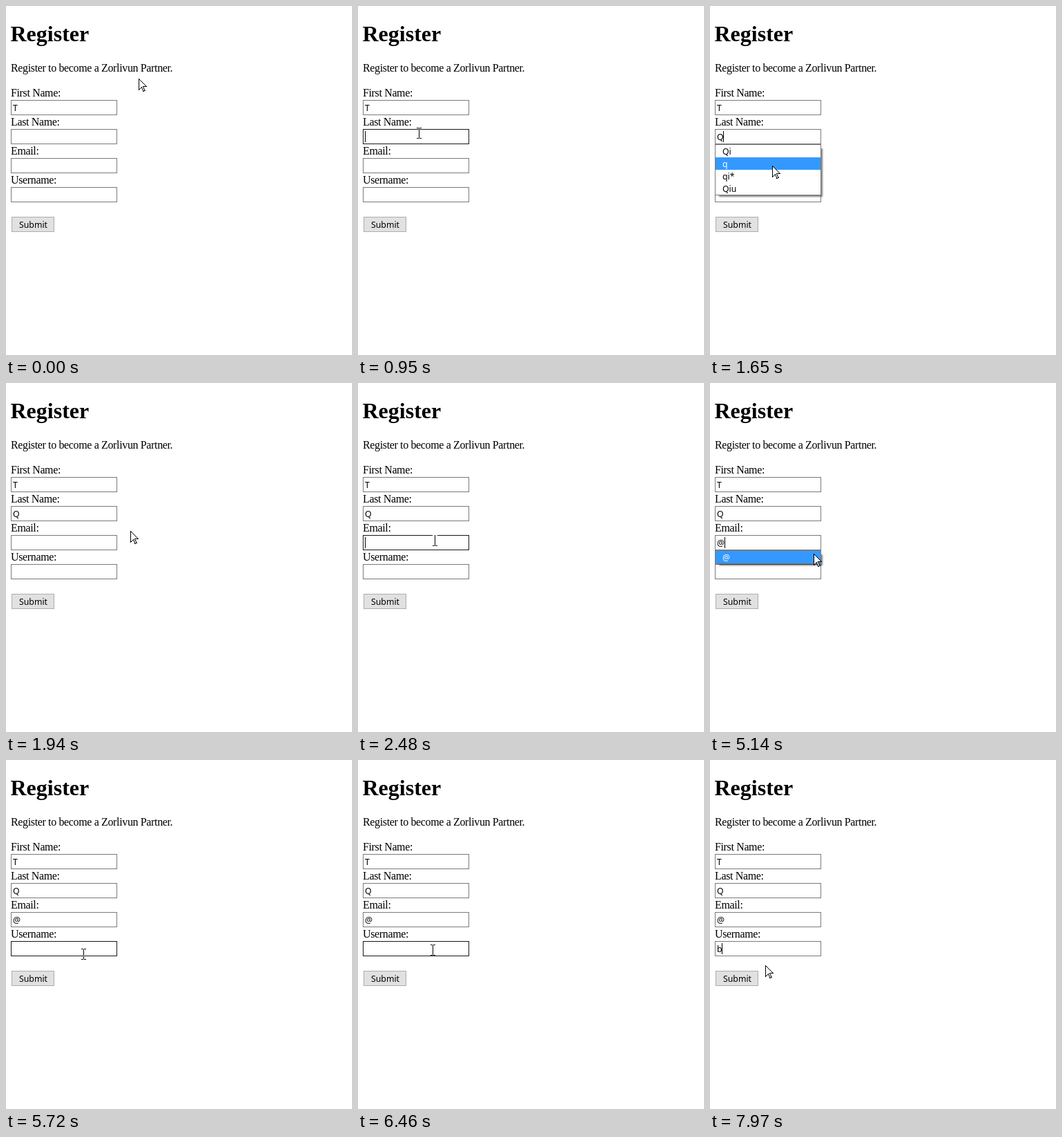
Write an HTML page that moves like this. It is 501 px wide and 505 px high and loops after 8000 ms.

```html
<!DOCTYPE html>
<html lang="en">
<head>
<meta charset="utf-8">
<title>Register</title>
<style>
  html, body { margin: 0; width: 100%; height: 100%; overflow: hidden; background: #fff; }
  svg { display: block; }
  text { font: 16px "Liberation Serif", "Times New Roman", serif; letter-spacing: -.36px; }
  .title { font-size: 32px; font-weight: bold; letter-spacing: 0; }
  .ui { font: 12.3px "Noto Sans", "Open Sans", sans-serif; letter-spacing: 0; }
  .box { fill: #fff; stroke: #7a7a7a; }
  .box.hover { stroke: #171717; }
  .shadow { fill: #000; opacity: .5; filter: blur(1px); }
  .item rect { fill: none; }
  .item.on rect { fill: #39f; }
  .item.on text { fill: #fff; }
  #arrow { fill: #fff; stroke: #000; shape-rendering: crispEdges; }
  #beam { fill: none; stroke: #fff; mix-blend-mode: difference; }
</style>
</head>
<body>
<svg id="stage" width="501" height="505" viewBox="0 0 501 505">
  <rect width="501" height="505" fill="#fff"/>
  <text class="title" x="6.5" y="51">Register</text>
  <text x="7" y="95">Register to become a Zorlivun Partner.</text>
  <g id="form"></g>
  <rect x="8.5" y="305.5" width="61" height="21" fill="#e1e1e1" stroke="#adadad"/>
  <text class="ui" x="19" y="321">Submit</text>
  <rect id="caret" width="1" height="16"/>
  <g id="menus"></g>
  <path id="arrow" d="M.5 .5V16.5L4.5 12.5L7 18.5L9 17.5L6.5 11.5H11.5Z"/>
  <path id="beam" d="M-3 -7.5H0M1 -7.5H4M.5 -7V7M-3 7.5H0M1 7.5H4"/>
</svg>
<script>
const LOOP = 8000, STEP = 140;
const LEFT = 7, WIDTH = 154, HEIGHT = 22, ROW = 18, INDENT = 10;
const BLINK = 1040, LIT = 440, TYPING_PAUSE = 100;
const $ = id => document.getElementById(id);

function add(parent, tag, attrs, text = '') {
  const el = document.createElementNS('http://www.w3.org/2000/svg', tag);
  for (const key in attrs) el.setAttribute(key, attrs[key]);
  el.textContent = text;
  return parent.appendChild(el);
}

const fields = [
  { label: 'First Name:', value: 'T', typed: 0 },
  { label: 'Last Name:', value: 'Q', focus: 950, typed: 1230, closed: 1940, blur: 1940, options: ['Qi', 'q', 'qi*', 'Qiu'] },
  { label: 'Email:', value: '@', focus: 2480, typed: 4980, closed: 5290, blur: 6020, options: ['@'] },
  { label: 'Username:', value: 'b', focus: 6020, typed: 7540, blur: LOOP }
];

// Pointer moves; it rests between them
const home = { x: 192, y: 105 };
const moves = [
  { from: 0, to: 820, x: 88, y: 184 },
  { from: 1230, to: 1650, x: 90, y: 231 },
  { from: 1650, to: 1940, x: 180, y: 214 },
  { from: 1940, to: 2360, x: 111, y: 228 },
  { from: 4980, to: 5140, x: 150, y: 247 },
  { from: 5140, to: 5720, x: 112, y: 281 },
  { from: 5720, to: 5870, x: 108, y: 275 },
  { from: 7540, to: 7970, x: 80, y: 297 }
];

fields.forEach((f, i) => {
  f.y = 136 + 42 * i;
  add($('form'), 'text', { x: LEFT, y: f.y - 5 }, f.label);
  f.box = add($('form'), 'rect', { class: 'box', x: LEFT + .5, y: f.y + .5, width: WIDTH - 1, height: HEIGHT - 1 });
  f.text = add($('form'), 'text', { class: 'ui', x: INDENT, y: f.y + 16 }, f.value);
  if (f.options) buildMenu(f);
});

function buildMenu(f) {
  const top = f.y + HEIGHT, height = f.options.length * ROW + 2;
  f.menu = add($('menus'), 'g', {});
  add(f.menu, 'rect', { class: 'shadow', x: LEFT + 6, y: top + 6, width: WIDTH - 4, height: height - 4 });
  add(f.menu, 'rect', { class: 'box', x: LEFT + .5, y: top + .5, width: WIDTH - 1, height: height - 1 });
  f.items = f.options.map((option, i) => {
    const y = top + 1 + i * ROW, item = add(f.menu, 'g', {});
    add(item, 'rect', { x: LEFT + 1, y, width: WIDTH - 2, height: ROW });
    add(item, 'text', { class: 'ui', x: 18, y: y + 14 }, option);
    return { item, y };
  });
}

const show = (el, on) => el.setAttribute('visibility', on ? 'visible' : 'hidden');
const place = (el, x, y) => el.setAttribute('transform', `translate(${x} ${y})`);

// Straight moves, sampled in even steps of about STEP ms
function pointer(t) {
  let { x, y } = home;
  for (const m of moves) {
    if (t < m.from) break;
    const steps = Math.round((m.to - m.from) / STEP);
    const part = Math.min(1, Math.floor((t - m.from) / (m.to - m.from) * steps) / steps);
    x += (m.x - x) * part;
    y += (m.y - y) * part;
  }
  return [Math.round(x), Math.round(y)];
}

function drawCaret(t) {
  const f = fields.find(f => t >= f.focus && t < f.blur);
  const typed = f && t >= f.typed;
  const since = f && t - (typed ? f.typed + TYPING_PAUSE : f.focus);
  show($('caret'), f && since % BLINK < LIT);
  if (f) place($('caret'), Math.floor(INDENT + (typed ? f.text.getComputedTextLength() : 0)), f.y + 3);
}

function draw(t) {
  const [x, y] = pointer(t);
  const within = (top, height) => x >= LEFT && x < LEFT + WIDTH && y >= top && y < top + height;
  let overMenu = false, overField = false;

  for (const f of fields) {
    show(f.text, t >= f.typed);
    if (!f.menu) continue;
    const open = t >= f.typed && t < f.closed;
    show(f.menu, open);
    for (const { item, y: top } of f.items) {
      const on = open && within(top, ROW);
      item.setAttribute('class', on ? 'item on' : 'item');
      overMenu ||= on;
    }
  }
  for (const f of fields) {
    const on = !overMenu && within(f.y, HEIGHT);
    f.box.classList.toggle('hover', on);
    overField ||= on;
  }

  drawCaret(t);
  show($('beam'), overField);
  show($('arrow'), !overField);
  place(overField ? $('beam') : $('arrow'), x, y);
}

const start = performance.now();
function tick() {
  draw((performance.now() - start) % LOOP);
  requestAnimationFrame(tick);
}
tick();
</script>
</body>
</html>
```
